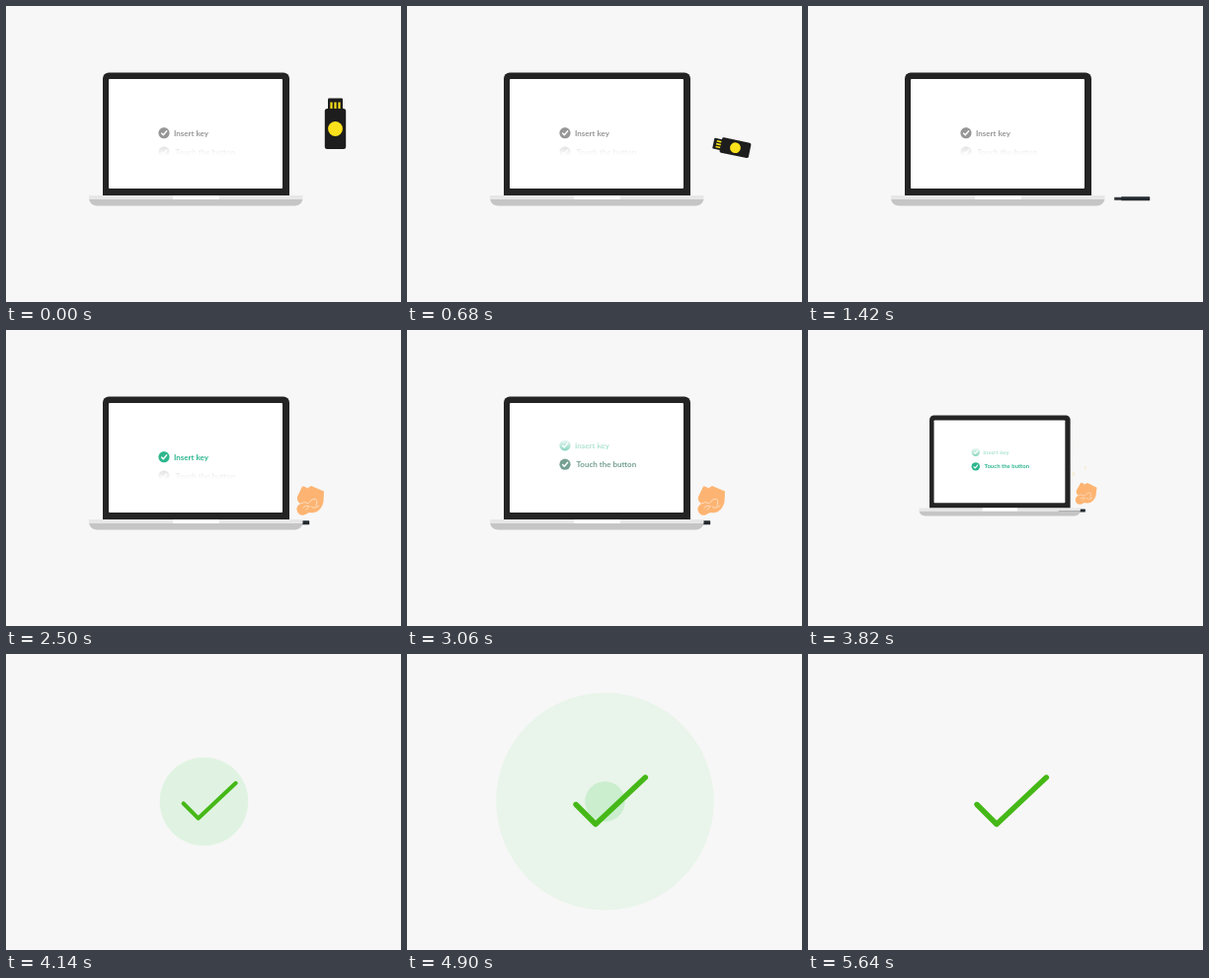
An HTML page for the animation above (7 s loop, 400 by 300 pixels).

```html
<!DOCTYPE html>
<html lang="en">
<head>
<meta charset="utf-8">
<title>Security key</title>
<style>
  html, body { margin: 0; width: 100%; height: 100%; overflow: hidden; background: #f7f7f7; }
  svg { display: block; width: 100vw; height: 100vh; }
  text { font: 700 8px Lato, "Open Sans", sans-serif; fill: currentColor; }
  .line { fill: none; stroke-linecap: round; stroke-linejoin: round; }
</style>
</head>
<body>
<svg viewBox="0 0 400 300">
  <defs>
    <linearGradient id="fade" gradientUnits="userSpaceOnUse" x1="0" y1="110" x2="0" y2="154">
      <stop offset="0" stop-color="#000"/>
      <stop offset=".29" stop-color="#999"/>
      <stop offset=".31" stop-color="#fff"/>
      <stop offset=".72" stop-color="#fff"/>
      <stop offset=".74" stop-color="#484848"/>
      <stop offset=".95" stop-color="#000"/>
    </linearGradient>
    <mask id="listMask" maskUnits="userSpaceOnUse" x="104" y="74" width="176" height="111">
      <rect x="104" y="74" width="176" height="111" fill="url(#fade)"/>
    </mask>
  </defs>

  <g id="scene">
    <g id="keyFace">
      <rect x="-7.5" y="-26" width="15" height="13" rx="1" fill="#1d1d1d"/>
      <path d="M-4 -22v7M0 -22v7M4 -22v7" stroke="#fbe11b" stroke-width="2.2"/>
      <rect x="-10.7" y="-15.5" width="21.4" height="41" rx="2.5" fill="#1d1d1d"/>
      <circle cy="5" r="7.4" fill="#fbe11b"/>
    </g>
    <g id="keySide">
      <rect x="-18" y="-1.5" width="9" height="3" fill="#30363a"/>
      <rect x="-11" y="-2" width="29" height="4" rx=".6" fill="#252b30"/>
    </g>

    <path d="M98 192V73.500a6 6 0 0 1 6-6H281a6 6 0 0 1 6 6V192z" fill="#242424"/>
    <rect x="104" y="74" width="176" height="111" rx="1" fill="#fff"/>
    <path d="M84 196H300.500q-2 6.500-8 6.500H92q-6 0-8-6.500z" fill="#c5c5c5"/>
    <rect x="84" y="192" width="216.500" height="4" fill="#e7e7e7"/>
    <rect x="169" y="192" width="47" height="4" rx="1" fill="#fff"/>

    <g mask="url(#listMask)">
      <g id="list">
        <g id="insert" transform="translate(160 128.700)">
          <circle r="5.600" fill="currentColor"/>
          <path class="line" d="M-2.400 .3L-.7 2L2.700 -2" stroke="#fff" stroke-width="1.400"/>
          <text x="10" y="2.800">Insert key</text>
        </g>
        <g id="touch" transform="translate(160 148)">
          <circle r="5.600" fill="currentColor"/>
          <path class="line" d="M-2.400 .3L-.7 2L2.700 -2" stroke="#fff" stroke-width="1.400"/>
          <text x="11.500" y="2.800">Touch the button</text>
        </g>
      </g>
    </g>

    <g id="sparks" fill="#f5c51c"></g>
    <g id="hand">
      <path d="M300 158.500Q303 158 305 160.500L309 158L322 163.500L321.500 174Q320 181 315 184Q311 186 307 185L302 187.500Q297 188.500 295 184Q293 179 298 176Q294 173 295 169Z" fill="#fdb472"/>
      <path class="line" d="M298 176Q302 173 306 175.500M301 180Q304 177 307 178.500Q306 181 304 182M307 175Q309 171 313 171Q316 173 314 178M309 179Q312 182 317 178" stroke="#fbe6d2" stroke-width=".8"/>
    </g>
  </g>

  <g id="pulses"></g>
  <path id="tick" class="line" d="M-35.200 4L-15.200 24L35.200 -23.500" stroke="#45b817" stroke-width="5.400"/>
</svg>
<script>
const LOOP = 7000;
const GREY = [150, 150, 150], GREEN = [46, 182, 141];
const $ = id => document.getElementById(id);
const clamp = x => Math.min(1, Math.max(0, x));
const span = (t, a, b) => clamp((t - a) / (b - a));
const lerp = (a, b, p) => a + (b - a) * p;
const smooth = p => p * p * (3 - 2 * p);
const outQuad = p => p * (2 - p);
const mix = (a, b, p) => `rgb(${a.map((v, i) => Math.round(lerp(v, b[i], p)))})`;
const move = (id, value) => $(id).setAttribute("transform", value);
const show = (id, alpha) => $(id).setAttribute("opacity", alpha);

// Eased value through a list of [time, value] steps.
function track(t, steps) {
  if (t <= steps[0][0]) return steps[0][1];
  for (let i = 1; i < steps.length; i++) {
    const [t0, v0] = steps[i - 1], [t1, v1] = steps[i];
    if (t < t1) return lerp(v0, v1, smooth((t - t0) / (t1 - t0)));
  }
  return steps[steps.length - 1][1];
}

function add(parent, tag) {
  const el = document.createElementNS("http://www.w3.org/2000/svg", tag);
  return $(parent).appendChild(el);
}

// x, y, half width, half height
const sparks = [
  [294.500, 153, 1.500, 4], [306.500, 146, 1.500, 3], [299, 123, .6, 1.500], [303, 138, .8, 1],
  [295, 132, .5, 1], [283, 121, .6, 1], [283.500, 144, .6, 1.200], [290, 145, .5, .8]
].map(([x, y, w, h]) => {
  const el = add("sparks", "path");
  el.setAttribute("d", `M0 ${-h}L${w} ${-h / 3}L0 ${h}L${-w} ${-h / 3}z`);
  return { el, x, y };
});

const pulses = [
  { start: 4400, length: 800, radius: 176 },
  { start: 4809, length: 800, radius: 176 }
];
const circles = [0, 1, 2].map(() => {
  const el = add("pulses", "circle");
  el.setAttribute("cx", 200.5);
  el.setAttribute("cy", 149.5);
  el.setAttribute("fill", "#c5eeca");
  return el;
});

function ring(el, radius, alpha) {
  el.setAttribute("r", radius);
  el.setAttribute("opacity", alpha);
}

function drawKey(t) {
  const turn = smooth(span(t, 140, 840));
  const fall = smooth(span(t, 860, 1160));
  const size = lerp(1, .69, turn);
  const x = lerp(333.5, 328.2, turn);
  const y = lerp(119.5, 146.5, turn) + 48.8 * fall;
  const flat = lerp(size, size * .28, fall);
  const dx = track(t, [[1420, 0], [1590, 7.5], [1860, -39]]);
  const side = span(fall, .8, 1);
  move("keyFace", `translate(${x} ${y}) scale(${size} ${flat}) rotate(${-90 * turn})`);
  show("keyFace", 1 - side);
  move("keySide", `translate(${x + dx} ${y})`);
  show("keySide", side);
}

function drawList(t) {
  $("insert").style.color = mix(GREY, GREEN, span(t, 1760, 1960));
  $("touch").style.color = mix(GREY, GREEN, span(t, 3000, 3200));
  move("list", `translate(0 ${-11.8 * smooth(span(t, 2600, 2950))})`);
}

function drawHand(t) {
  const enter = outQuad(span(t, 2260, 2460));
  const press = track(t, [[2500, 0], [2660, 5], [2820, 0], [3080, 0], [3220, 4], [3380, 0]]);
  const tilt = track(t, [[3080, 0], [3380, 4]]);
  const size = lerp(.7, 1, enter);
  move("hand", `translate(308 ${173 + press}) rotate(${tilt}) scale(${size}) translate(-308 -173)`);
  show("hand", enter);
  const flight = outQuad(span(t, 3250, 3910)) / outQuad(.5);
  sparks.forEach(({ el, x, y }) =>
    el.setAttribute("transform", `translate(${lerp(304, x, flight)} ${lerp(172, y, flight)})`));
  show("sparks", span(t, 3250, 3300) * (1 - span(t, 3660, 3860)));
}

function draw(t) {
  drawKey(t);
  drawList(t);
  drawHand(t);

  const size = 1 - span(t, 3454, 4040) ** 3;
  move("scene", `translate(200 145) scale(${size}) translate(-200 -145)`);
  show("scene", size > 0 ? 1 : 0);

  const pop = outQuad(span(t, 3980, 4300));
  move("tick", `translate(206.2 148.5) scale(${pop})`);
  show("tick", pop > 0 ? 1 : 0);

  ring(circles[0], 59.5 * pop, (1 - span(t, 3980, 4300)) ** 1.1);
  pulses.forEach(({ start, length, radius }, i) => {
    const p = span(t, start, start + length);
    ring(circles[i + 1], radius * p, (1 - p) ** 1.3);
  });
}

const begin = performance.now();
function frame() {
  draw((performance.now() - begin) % LOOP);
  requestAnimationFrame(frame);
}
frame();
</script>
</body>
</html>
```
